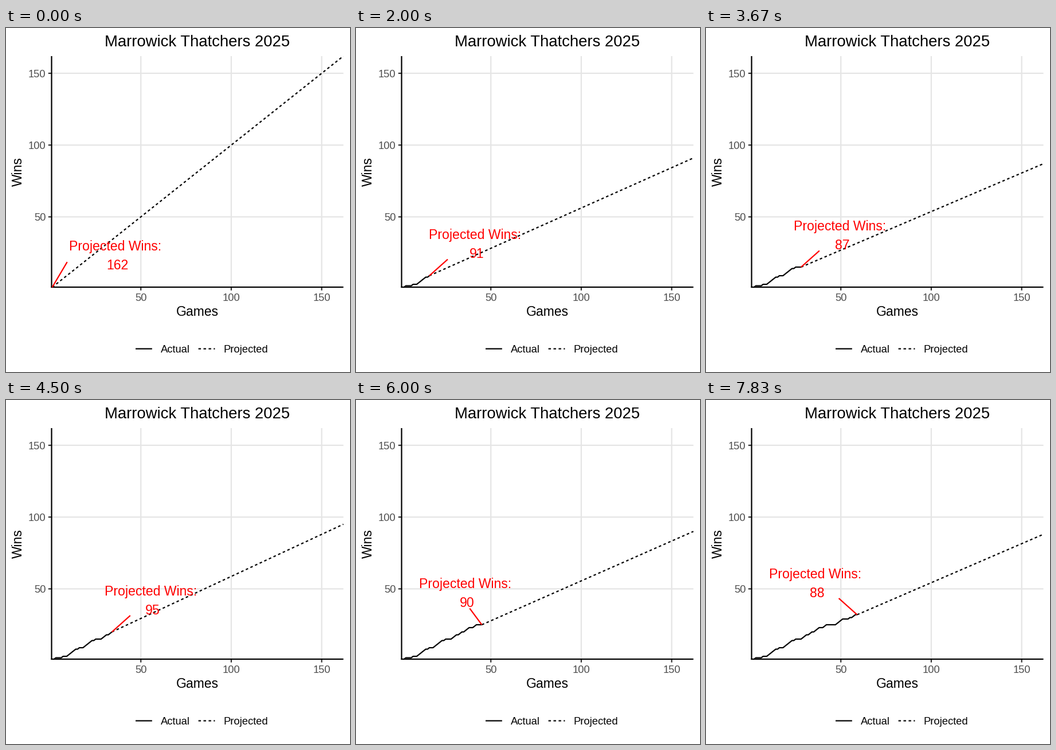
Animation of 600 by 600 pixels, one loop 8000 ms. Source, as a matplotlib script:

```python
import numpy as np
import matplotlib.pyplot as plt
from matplotlib.animation import FuncAnimation
from matplotlib.patches import Rectangle

SIZE, DPI = 600, 100
LOOP_MS, TICK_MS, STEPS = 8000, 40, 48
LEAD_MS = 34                       # a tick shows the step that starts within it
SEASON = 162
PT = 72 / DPI                      # points per pixel
LINE = 2.22 * PT
LEFT, RIGHT, TOP, BOTTOM = 79.5, 588.5, 49, 452

RESULTS = ("WLWLLLWLLWWWWWLWLLWWWWWLWLLLWWWLWWL"
           "WWWLLWWLLLLLWWWWLLLWLWWL")
games = np.arange(1, len(RESULTS) + 1)
wins = np.cumsum([r == "W" for r in RESULTS])

plt.rcParams["font.family"] = "Liberation Sans"


def px(game):
    return 235.2 + (game - 50) * 3.154


def py(win):
    return 329.4 - (win - 50) * 2.504


fig = plt.figure(figsize=(SIZE / DPI, SIZE / DPI), dpi=DPI, facecolor="white")
ax = fig.add_axes([0, 0, 1, 1])
ax.set(xlim=(0, SIZE), ylim=(SIZE, 0))
ax.axis("off")

panel = Rectangle((LEFT, TOP), RIGHT - LEFT, BOTTOM - TOP, transform=ax.transData)


def line(xs, ys, color="black", clip=False, **kw):
    art, = ax.plot(xs, ys, color=color, lw=LINE, solid_capstyle="butt",
                   dash_capstyle="butt", snap=False, **kw)
    if clip:
        art.set_clip_path(panel)
    return art


def label(x, y, s, size, color="black", ha="center", **kw):
    return ax.text(x, y, s, fontsize=size * PT, color=color, ha=ha,
                   va="baseline", **kw)


DASH = (0, (2, 2))

# Grid, ticks and axes
for v in (50, 100, 150):
    x, y = px(v), py(v)
    line([x, x], [TOP, BOTTOM], "#E5E5E5", zorder=1)
    line([LEFT, RIGHT], [y, y], "#E5E5E5", zorder=1)
    line([x, x], [BOTTOM, BOTTOM + 5.7], "#333333", zorder=5)
    line([LEFT - 5.7, LEFT], [y, y], "#333333", zorder=5)
    label(x, 476.3, str(v), 18.33, "#4D4D4D")
    label(69.3, y + 6.6, str(v), 18.33, "#4D4D4D", ha="right")
line([LEFT, LEFT], [TOP, BOTTOM + 1], zorder=5)
line([LEFT - 1, RIGHT], [BOTTOM, BOTTOM], zorder=5)

label(334, 32, "Marrowick Thatchers 2025", 27.5)
label(334, 502, "Games", 22.92)
label(28.4, 251, "Wins", 22.92, rotation=90, rotation_mode="anchor")

# Legend
line([226, 254.8], [559.5, 559.5])
line([335.6, 364.4], [559.5, 559.5], ls=DASH)
label(269.5, 566, "Actual", 18.33, ha="left")
label(379.3, 566, "Projected", 18.33, ha="left")

projected = line([], [], clip=True, ls=DASH, zorder=6)
actual = line([], [], clip=True, zorder=6)
pointer = line([], [], "red", zorder=7)
caption = label(0, 0, "Projected Wins:", 23, "red", zorder=8)
count = label(0, 0, "", 23, "red", zorder=8)


def caption_x(game):
    """The label rides ahead of the point, then settles behind it."""
    if game >= 37:
        return 190.4
    if game >= 23:
        return px(game) + 68
    return np.interp(game, [1, 6, 16, 18, 20, 23],
                     [190.4, 193.2, 207.6, 207, 210.5, 218.5])


def pointer_end(x, y, cx):
    edge = cx - 83.7
    if x < edge:
        return edge, y - 44
    dx = cx - x
    return x + np.sign(dx) * min(32, 0.73 * abs(dx)), y - 28.6


def update(tick):
    step = (tick * TICK_MS + LEAD_MS) * STEPS // LOOP_MS % STEPS
    game = int((step + 0.5) * (SEASON - 1) / 131) + 1
    won = wins[game - 1]
    total = int(round(SEASON * won / game))
    x, y = px(game), py(won)
    cx = caption_x(game)
    ex, ey = pointer_end(x, y, cx)

    actual.set_data(px(games[:game]), py(wins[:game]))
    projected.set_data([x, px(SEASON)], [y, py(total)])
    pointer.set_data([x, ex], [y, ey])
    caption.set_position((cx, y - 63.8))
    count.set_position((cx + 3.5, y - 30.6))
    count.set_text(str(total))
    return projected, actual, pointer, caption, count


anim = FuncAnimation(fig, update, frames=LOOP_MS // TICK_MS, interval=TICK_MS,
                     repeat=True, repeat_delay=0, blit=False)
plt.show()
```
